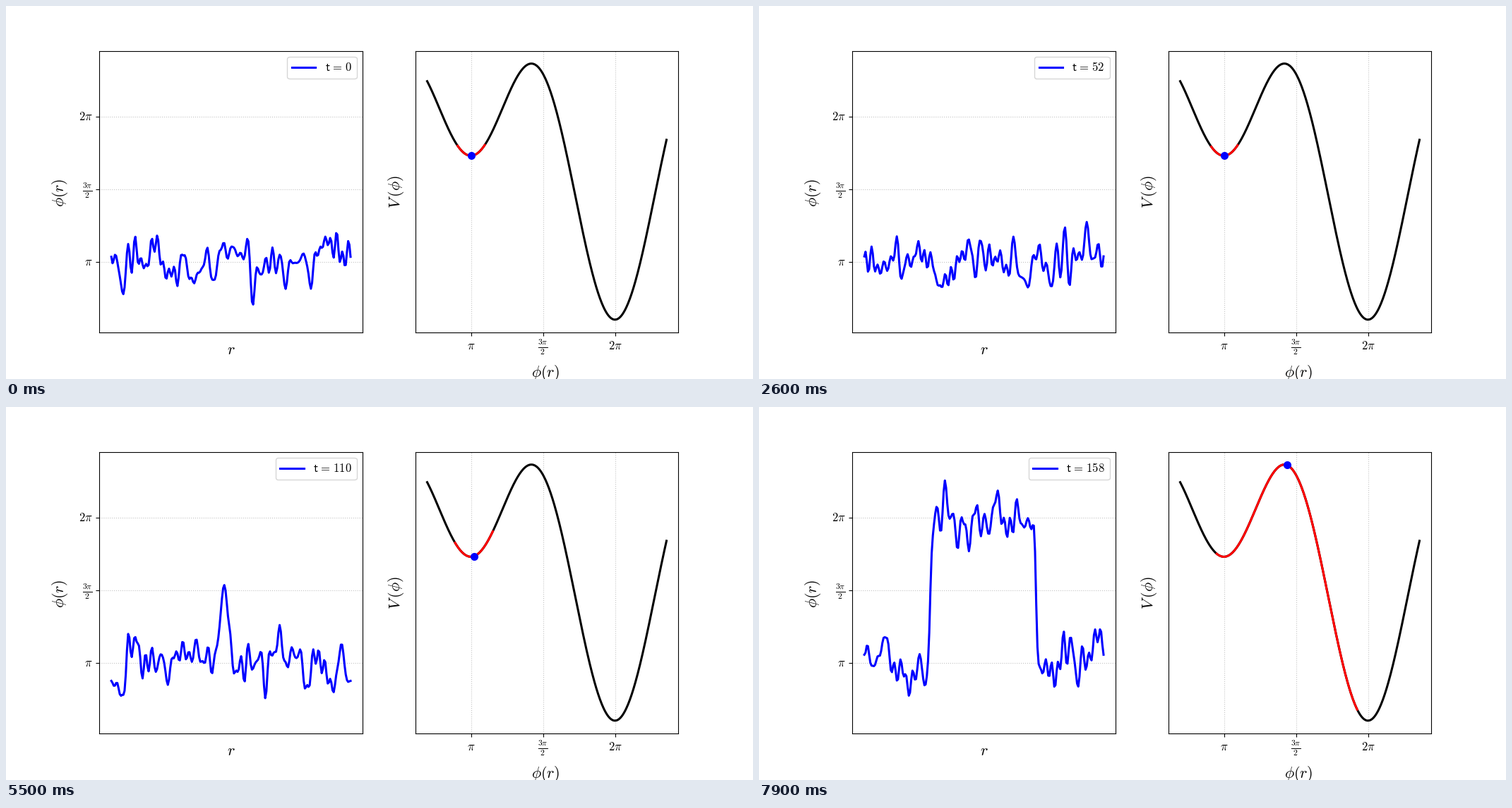
A matplotlib script for the animation above (8 s loop, 1058 by 529 pixels).

```python
import numpy as np
import matplotlib.pyplot as plt
from matplotlib.animation import FuncAnimation

W, H, DPI = 1058, 529, 100
FRAMES, INTERVAL = 80, 100
PI = np.pi
LENGTH = 338.8                  # spatial extent of the lattice
SPEED, MASS = 3.7, 1.2          # wave speed and mass per frame
NUCLEATION = 60                 # frame at which the lump becomes a bubble
GROWTH = 3.4                    # wall speed per frame
LEFT, TOP, BOTTOM = 132.25, 63.5, 463
WIDTH, GAP = 372.7, 74.55

plt.rcParams.update({"mathtext.fontset": "cm", "font.size": 12})

# thermal waves with a relativistic dispersion relation
rng = np.random.default_rng(12)
r = np.linspace(0, LENGTH, 200)
mode = np.arange(-45, 46)
k = 2 * PI * mode / LENGTH
omega = np.hypot(SPEED * k, MASS)
amp = rng.rayleigh(1, mode.size) / np.sqrt(1 + (mode / 15) ** 2)
amp *= 0.31 / np.sqrt(np.sum(amp ** 2) / 2)
phase = rng.uniform(0, 2 * PI, mode.size)


def potential(phi):
    return np.sin(phi) ** 2 - np.cos(phi) / 2


def lump(i, noise):
    """Wobbling, drifting peak that seeds the bubble."""
    centre = np.interp(i, [45, 55, 60], [126, 159, 168])
    height = np.interp(i, [41, 45, 55, 60], [0, 1.45, 1.68, 3.3])
    if i < 55:
        swing = np.cos(2 * PI * (i - 45) / 5)
        height *= max(swing, 0.8 * swing)
    shape = np.exp(-((r - centre) / 8) ** 2)
    damp = 0.7 * np.interp(i, [41, 45], [0, 1])
    return noise * (1 - damp * shape) + height * shape


def bubble(i):
    half = 10.2 + GROWTH * (i - NUCLEATION)
    x = r - 168
    return PI / 2 * (np.tanh((x + half) / 2.5) - np.tanh((x - half) / 2.5))


def field(i):
    noise = np.cos(np.outer(r, k) - omega * i + phase) @ amp
    if i < NUCLEATION:
        return PI + lump(i, noise)
    return PI + noise + bubble(i)


fig = plt.figure(figsize=(W / DPI, H / DPI), dpi=DPI, facecolor="white")


def panel(left):
    ax = fig.add_axes([left / W, 1 - BOTTOM / H, WIDTH / W, (BOTTOM - TOP) / H])
    ax.set(xticks=[], yticks=[])
    ax.set_axisbelow(True)
    return ax


def label(x, y, text, size=12, **kw):
    opts = dict(ha="center", va="baseline") | kw
    fig.text(x / W, 1 - y / H, text, size=size, **opts)


def time_text(i):
    return r"$\mathsf{t\hspace{0.13}=\hspace{0.13}%d}$" % (2 * i)


VACUA = [PI, 1.5 * PI, 2 * PI]
NAMES = [r"$\pi$", r"$\frac{3\pi}{2}$", r"$2\pi$"]
GRID = dict(ls=":", lw=0.8, color="#b0b0b0", alpha=0.75)

# field profile
ax1 = panel(LEFT)
margin = 0.05 * LENGTH
ax1.set_xlim(-margin, LENGTH + margin)
ax1.set_ylim(PI - (BOTTOM - 363) / 65.57, PI + (363 - TOP) / 65.57)
ax1.set_yticks(VACUA, [""] * 3)
ax1.grid(axis="y", **GRID)
line, = ax1.plot([], [], color="blue", lw=2.2, label=time_text(0))
legend = ax1.legend(loc="upper right")
for y, name in zip((367.5, 265.5, 162), NAMES):
    label(122.5, y, name, ha="right")
label(76, 264.5, r"$\phi(r)$", 16, rotation=90, va="center")
label(318.5, 494.5, r"$r$", 16)

# potential
ax2 = panel(LEFT + WIDTH + GAP)
phi = np.linspace(2.187, 7.407, 400)
x0 = 658.5 - LEFT - WIDTH - GAP
ax2.set_xlim(PI - x0 / 64.94, PI + (WIDTH - x0) / 64.94)
ax2.set_xticks(VACUA, [""] * 3)
ax2.grid(axis="x", **GRID)
ax2.plot(phi, potential(phi), color="black", lw=2.2)
ax2.set_ylim(-0.5 - 0.05 * 1.5625, 1.0625 + 0.05 * 1.5625)
spread, = ax2.plot([], [], color="red", lw=2.2)
dot, = ax2.plot([], [], "o", color="blue", ms=7)
for x, name in zip((658.5, 760.5, 862.5), NAMES):
    label(x, 487, name)
label(552, 263.5, r"$V\hspace{0.2}(\phi)$", 16, rotation=90, va="center")
label(764.5, 526.5, r"$\phi(r)$", 16)


def update(i):
    u = field(i)
    line.set_data(r, u)
    mean, std = u.mean(), u.std()
    span = np.linspace(mean - std, mean + std, 150)
    spread.set_data(span, potential(span))
    dot.set_data([mean], [potential(mean)])
    legend.get_texts()[0].set_text(time_text(i))
    return line, spread, dot


anim = FuncAnimation(fig, update, frames=FRAMES, interval=INTERVAL,
                     repeat=True, repeat_delay=0, blit=False)
plt.show()
```
